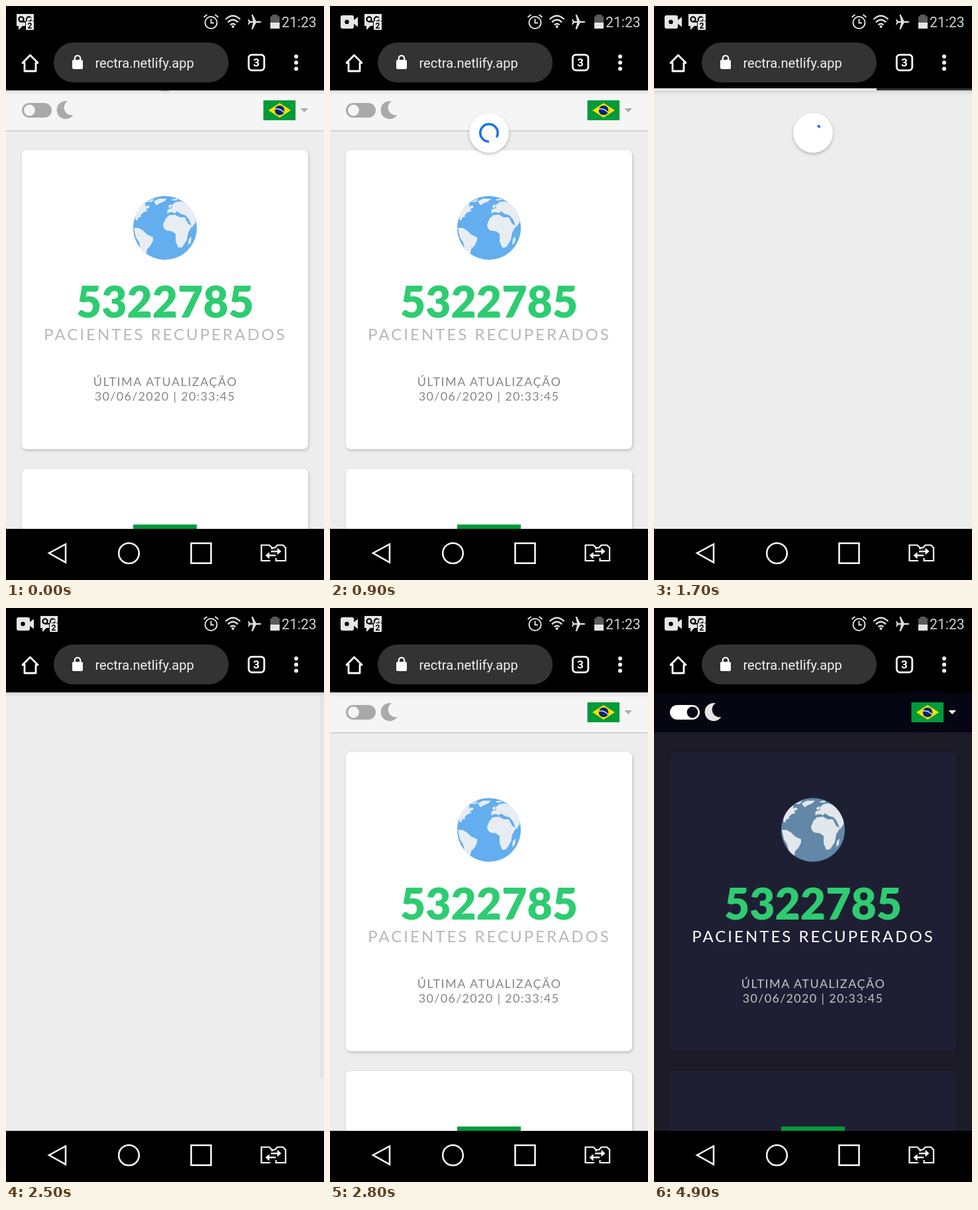
Animation, 480 px wide and 864 px high, one loop 5000 ms. Source, as an HTML page:

```html
<!DOCTYPE html>
<html lang="pt">
<head>
<meta charset="utf-8">
<title>Pacientes recuperados</title>
<style>
  html, body { margin: 0; width: 100%; height: 100%; overflow: hidden; background: #000; }
  svg {
    display: block; width: 480px; height: 864px;
    --bg: #ededed; --bar: #f5f5f5; --card: #fff; --label: #b8b8b8; --note: #868686;
    --caret: #aaa; --track: #a9a9a9; --thumb: #f5f5f5; --shade: .2;
  }
  svg.dark {
    --bg: #1c1b26; --bar: #060612; --card: #1f1f33; --label: #fff; --note: #c4c4c8;
    --caret: #fff; --track: #fff; --thumb: #080816; --shade: .08;
  }
  text { font-family: Roboto, sans-serif; }
  .lato { font-family: Lato, sans-serif; text-anchor: middle; }
  .card { fill: var(--card); filter: drop-shadow(1px 2px 2px rgba(0, 0, 0, var(--shade))); }
  .line { fill: none; stroke: #fff; }
</style>
</head>
<body>
<svg id="stage" viewBox="0 0 480 864">
  <defs>
    <clipPath id="view"><rect y="127" width="480" height="660"/></clipPath>
    <clipPath id="disc"><circle cx="240" cy="334" r="48"/></clipPath>
    <linearGradient id="fade" x2="0" y2="1">
      <stop stop-opacity=".1"/><stop offset="1" stop-opacity="0"/>
    </linearGradient>
  </defs>

  <rect width="480" height="864"/>

  <g clip-path="url(#view)">
    <rect y="127" width="480" height="660" fill="var(--bg)"/>
    <g id="page">
      <rect y="127" width="480" height="60" fill="var(--bar)" style="filter:drop-shadow(0 1px 1px rgba(0,0,0,var(--shade)))"/>

      <rect x="24" y="146" width="45" height="22" rx="11" fill="var(--track)"/>
      <circle id="thumb" cy="157" r="8.4" fill="var(--thumb)"/>
      <rect id="tap" x="24" y="146" width="45" height="22" fill="#33b5e5" fill-opacity=".4"/>
      <path id="moon" d="M93 143.2A13.6 13.6 0 1 0 101.5 164A11.4 11.4 0 0 1 93 143.2Z"/>

      <rect x="388.500" y="142" width="48.500" height="30" fill="#009b3a"/>
      <path d="M396 157L413 146L430 157L413 168Z" fill="#fedf00"/>
      <circle cx="413" cy="157" r="7.3" fill="#002776"/>
      <path d="M406 155Q414 154 419.500 160" fill="none" stroke="#fff" stroke-width="1.3"/>
      <path d="M444.500 154H456L450.200 160Z" fill="var(--caret)"/>

      <rect class="card" x="24" y="217" width="432" height="450" rx="7"/>
      <rect class="card" x="24" y="697" width="432" height="450" rx="7"/>
      <rect x="192" y="780.500" width="96" height="60" fill="#009b3a"/>

      <circle id="sea" cx="240" cy="334" r="48"/>
      <g id="land" clip-path="url(#disc)">
        <path d="M195 321L196 312L203 302L211 297L210 302L215 300L217 303L211 306L214 308L207 311L203 315L205 317L200 318L198 323Z"/>
        <path d="M213 295L224 290L220 295ZM223 294L231 290L243 290L239 294L232 297L227 300L225 297Z"/>
        <path d="M193 334L200 334L207 338L213 344L222 348L222 353L218 361L213 366L211 376L216 379L208 375L203 365L201 356L196 348Z"/>
        <path d="M237 329L241 320L246 315L255 314L262 318L270 318L275 328L281 331L275 341L273 352L266 363L260 364L256 354L256 343L250 339L242 338L238 334Z"/>
        <path d="M243 312L244 306L251 304L250 300L256 295L264 294L274 298L281 304L287 318L286 326L281 333L276 321L271 315L264 313L258 309L255 312L250 310Z"/>
        <path d="M245 301L249 298L250 303L246 304ZM250 291L258 290L259 292L252 293ZM276 351L280 347L279 356L275 360Z"/>
      </g>

      <text class="lato" x="240" y="469" font-size="66" font-weight="900" fill="#2ecc71">5322785</text>
      <text class="lato" x="240.500" y="503" font-size="24" letter-spacing="3" fill="var(--label)">PACIENTES RECUPERADOS</text>
      <g font-size="18" fill="var(--note)">
        <text class="lato" x="240.500" y="572" letter-spacing="1.5">ÚLTIMA ATUALIZAÇÃO</text>
        <text class="lato" x="240" y="594" letter-spacing="1.3">30/06/2020 | 20:33:45</text>
      </g>
    </g>
    <rect id="scroll" x="474" y="127" width="6" height="580" fill="#e4e4e4"/>
    <rect y="127" width="480" height="7" fill="url(#fade)"/>
    <ellipse id="hint" cx="240" cy="126.500" rx="8" ry="2" fill-opacity=".22"/>
    <g id="bubble">
      <circle r="30" fill="#fff" style="filter:drop-shadow(0 2px 2px rgba(0,0,0,.25))"/>
      <g id="ring" stroke="#1a73e8">
        <circle id="arc" r="13.200" fill="none" stroke-width="3.600" pathLength="360"/>
        <path id="arrow" d="M8 0H18.500L13.200 5.500Z" fill="#1a73e8" stroke="none"/>
      </g>
    </g>
  </g>

  <g id="loading">
    <rect y="124" width="480" height="3" fill="#333"/>
    <rect id="loaded" y="124" height="3" fill="#fff"/>
  </g>

  <g id="camera" fill="#e6e6e6">
    <rect x="16" y="14" width="20" height="20" rx="3"/>
    <path d="M35 22L42 16.500V31.500L35 26Z"/>
    <circle cx="25.500" cy="24" r="3.200" fill="#000"/>
  </g>
  <g id="voicemail">
    <path d="M0 12H26V30H9L3 36V30H0Z" fill="#e6e6e6"/>
    <g fill="none" stroke="#000" stroke-width="2.200">
      <circle cx="7" cy="20" r="3.600"/><circle cx="18.500" cy="20" r="3.600"/><path d="M7 23.600H14"/>
    </g>
    <rect x="13.500" y="22.500" width="13" height="14" rx="1.500" fill="#e6e6e6" stroke="#000"/>
    <path d="M16.500 24V22A3.500 3.500 0 0 1 23.500 22V24" fill="none" stroke="#e6e6e6" stroke-width="1.800"/>
    <text x="20" y="34.200" font-size="12" font-weight="700" text-anchor="middle">2</text>
  </g>

  <g fill="none" stroke="#e0e0e0" stroke-width="2">
    <circle cx="309.500" cy="25" r="9"/>
    <path d="M309.500 19.500V25.500H314M298.500 17L303.500 13M320.500 17L315.500 13"/>
    <path d="M331.500 20Q342.500 9.500 353.500 20M335 24.500Q342.500 17 350 24.500M338.500 28.500Q342.500 25 346.500 28.500" stroke-width="2.300"/>
  </g>
  <circle cx="342.500" cy="31" r="2" fill="#e0e0e0"/>
  <path d="M385.500 24Q385 22.700 382 22.700H377.500L372.500 13H370.500L373 22.700H368.500L366.500 20H365L366.300 24L365 28H366.500L368.500 25.300H373L370.500 35H372.500L377.500 25.300H382Q385 25.300 385.500 24Z" fill="#e0e0e0"/>
  <path d="M402 13H410V15.500H413V25H399V15.500H402Z" fill="#5a5a5a"/>
  <rect x="399" y="25" width="14" height="9" fill="#e6e6e6"/>
  <text x="416" y="32" font-size="21.200" fill="#cfcfcf">21:23</text>

  <rect x="72" y="55" width="264" height="60" rx="30" fill="#333"/>
  <path class="line" d="M36.500 74L48 85.500H45V98H28V85.500H25Z" stroke-width="2.800" stroke-linejoin="round"/>
  <rect x="100" y="81" width="16" height="14" rx="2" fill="#fff"/>
  <path class="line" d="M103.800 82V78.800A4.200 4.200 0 0 1 112.200 78.800V82" stroke-width="2.200"/>
  <text x="134.500" y="93" font-size="20.100" fill="#f0f0f0">rectra.netlify.app</text>
  <rect class="line" x="366.300" y="73.300" width="23.500" height="23.500" rx="5" stroke-width="2.800"/>
  <text x="378" y="91" font-size="17" font-weight="700" fill="#fff" text-anchor="middle">3</text>
  <g fill="#fff"><circle cx="438" cy="76" r="3"/><circle cx="438" cy="85.200" r="3"/><circle cx="438" cy="94.500" r="3"/></g>

  <g class="line" stroke-width="2.500">
    <path d="M65 823.500L90 810V837.500Z"/>
    <circle cx="185.500" cy="823.800" r="15.300"/>
    <rect x="279.500" y="808.700" width="30" height="30"/>
    <path d="M399 835H385.500V811.500H397.500L401.500 815.500V818M401.500 815.500H406L409.500 811.500H418L422 815.500V835H407.500V831" stroke-width="2.200"/>
    <path d="M400 821H412M407 827H395" stroke-width="2.400"/>
  </g>
  <path d="M409.500 815.500L415.500 821L409.500 826ZM397.500 822L391.500 827L397.500 832.500Z" fill="#fff"/>
</svg>
<script>
const LOOP = 5000, STEP = 100;
const el = id => document.getElementById(id);
const set = (id, attrs) => Object.entries(attrs).forEach(([k, v]) => el(id).setAttribute(k, v));
const show = (id, on) => set(id, { visibility: on ? 'visible' : 'hidden' });
const part = (t, from, to) => Math.min(1, Math.max(0, (t - from) / (to - from)));
const smooth = u => u * u * (3 - 2 * u);
const mix = (a, b, u) => a + (b - a) * u;
const blend = (a, b, u) => `rgb(${a.map((v, i) => Math.round(mix(v, b[i], u)))})`;

function bubbleY(t) {
  return t < 600
    ? mix(122, 217, Math.sin(part(t, 300, 600) * Math.PI / 2))
    : mix(217, 191, 1 - (1 - part(t, 600, 850)) ** 2);
}

// Start angle and sweep in degrees: pull, collapse, then spin
function ringArc(t) {
  if (t < 1000) {
    const u = part(t, 300, 650);
    return [mix(-60, 90, u), 300 * u];
  }
  if (t < 1667) {
    const u = part(t, 1000, 1667), sweep = mix(300, 18, u);
    return [mix(390, 675, u) - sweep, sweep];
  }
  const p = (t - 1667) / 1332;
  return [297 + 216 * p, 18 + 270 * smooth(Math.min(1, 2 * p))];
}

function drawBubble(t) {
  const visible = t >= 300 && t < 2400;
  show('bubble', visible);
  show('arrow', visible && t < 800);
  const [start, sweep] = ringArc(t);
  set('bubble', { transform: `translate(240 ${bubbleY(t)}) scale(${1 - part(t, 2150, 2400)})` });
  set('ring', { transform: `rotate(${start})`, opacity: mix(.3, 1, part(t, 300, 600)) });
  set('arc', { 'stroke-dasharray': `${sweep} 720` });
  set('arrow', { transform: `rotate(${sweep})` });
}

function draw(t) {
  el('stage').classList.toggle('dark', t >= 4500);
  show('camera', t >= 100);
  set('voicemail', { transform: `translate(${t < 100 ? 16 : 52} 0)` });
  show('hint', t < 100);
  drawBubble(t);

  show('loading', t >= 1200 && t < 2200);
  set('loaded', { width: 480 * (t < 1700 ? mix(.3, .7, part(t, 1200, 1700)) : mix(.7, 1, part(t, 1700, 2100))) });
  set('page', { opacity: t < 1700 ? 1 : part(t, 2500, 2800) });
  show('scroll', t >= 2200 && t < 2800);

  const night = part(t, 4500, 4900);
  set('thumb', { cx: mix(35.5, 58, smooth(part(t, 4380, 4800))) });
  show('tap', t >= 4500 && t < 4700);
  set('moon', { fill: blend([170, 170, 170], [230, 230, 230], night) });
  set('sea', { fill: blend([98, 174, 239], [98, 135, 167], night) });
  set('land', { fill: blend([232, 237, 243], [226, 231, 235], night) });
}

let origin;
function tick(now) {
  origin ??= now;
  draw(Math.floor((now - origin) % LOOP / STEP) * STEP);
  requestAnimationFrame(tick);
}
draw(0);
requestAnimationFrame(tick);
</script>
</body>
</html>
```
